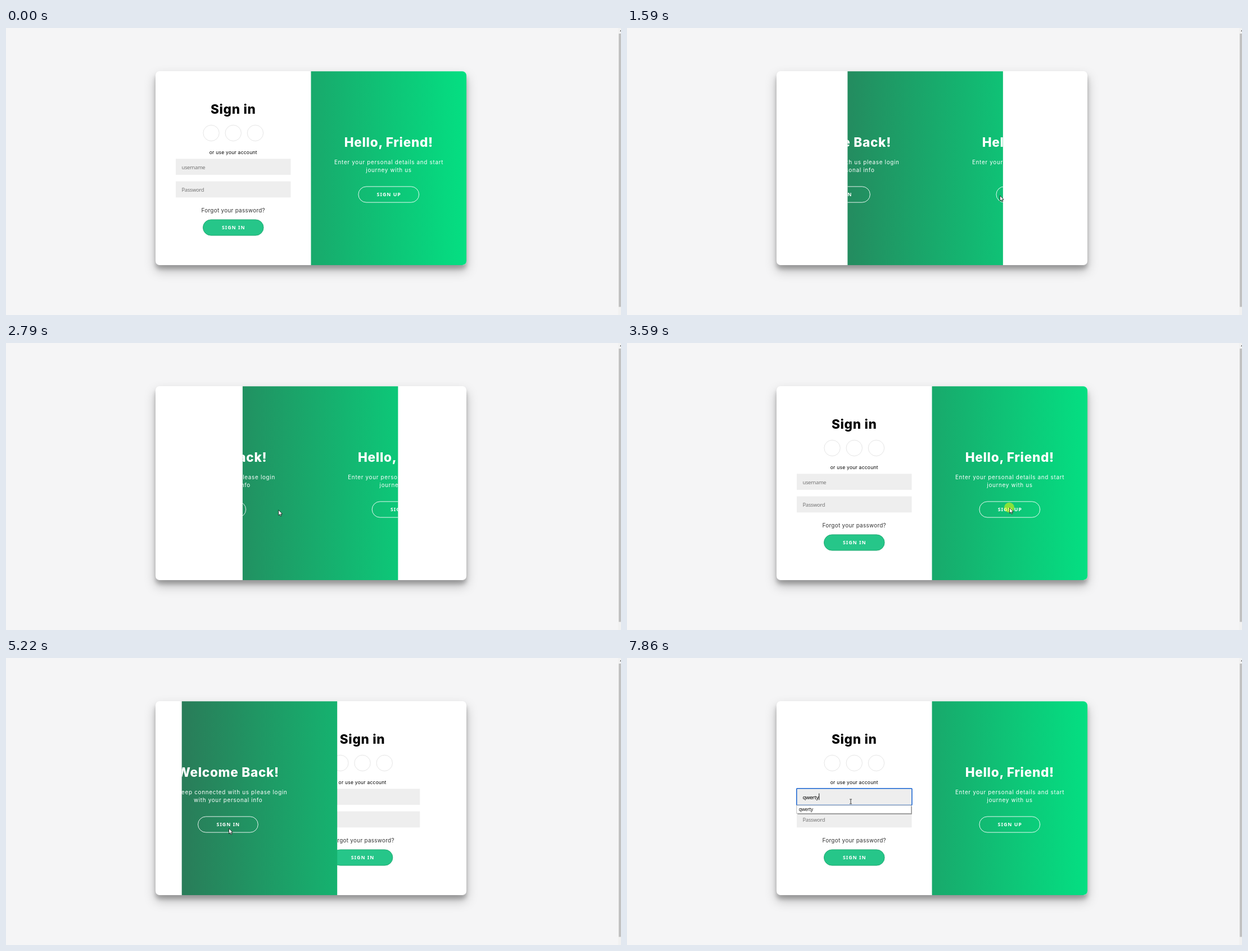
Animation of 1094x512 px, one loop 8000 ms. Source, as an HTML page:

```html
<!DOCTYPE html>
<html lang="en">
<head>
<meta charset="utf-8">
<title>Sliding sign-in form</title>
<style>
  html, body { margin: 0; width: 100%; height: 100%; overflow: hidden; background: #f5f5f6; }
  #card {
    position: absolute; left: 266px; top: 77.3px; width: 553px; height: 345.6px;
    border-radius: 7.2px; background: #fff;
    box-shadow: 0 10px 20px rgba(0,0,0,.25), 0 7.2px 7.2px rgba(0,0,0,.22);
  }
  svg { position: absolute; left: 0; top: 0; display: block; }
  text { font-family: Inter, sans-serif; white-space: pre; }
  .mid { text-anchor: middle; }
  .title { font-size: 22.6px; font-weight: 800; letter-spacing: .7px; }
  .lead { font-size: 9.9px; letter-spacing: .69px; fill: #fff; }
  .hint { font-size: 8.5px; letter-spacing: .25px; }
  .link { font-size: 9.9px; letter-spacing: .3px; fill: #333; }
  .input { font-family: "Noto Sans", sans-serif; font-size: 9.4px; letter-spacing: -.35px; fill: #757575; }
  .label { font-family: "Noto Sans", sans-serif; font-size: 8.8px; font-weight: 700; letter-spacing: 1px; fill: #fff; }
</style>
</head>
<body>
<div id="card"></div>
<svg id="stage" width="1094" height="512" viewBox="0 0 1094 512"></svg>
<script>
const LOOP = 8000, LEFT = 266, HALF = 276.5, MID = LEFT + HALF;
const LC = LEFT + HALF / 2, RC = MID + HALF / 2;

const text = (cls, x, y, s, extra = '') => `<text class="${cls}" x="${x}" y="${y}" ${extra}>${s}</text>`;
const centred = (cls, x, y, s) => text('mid ' + cls, x, y, s);
const field = (x, y, s, id = '') =>
  `<rect x="${x}" y="${y}" width="204.5" height="28.7" fill="#eee"/>` +
  text('input', x + 10.5, y + 18.2, s, id && `id="${id}"`);
const circles = (cx, cy) => [-39.2, 0, 39.2].map(d =>
  `<circle cx="${cx + d}" cy="${cy}" r="14.2" fill="none" stroke="#ddd" stroke-width=".8"/>`).join('');
const button = (cx, y, w, s, fill, stroke, id = '') =>
  `<g id="${id}"><rect x="${cx - w / 2}" y="${y}" width="${w}" height="28.2" rx="14.1" fill="${fill}"
    stroke="${stroke}" stroke-width=".9"/>${centred('label', cx + .5, y + 17.3, s)}</g>`;
const solid = (cx, y, s) => button(cx, y, 107.6, s, '#26c689', '#1ba56c');

const signIn = centred('title', LC, 152.9, 'Sign in') + circles(LC, 187.4) +
  centred('hint', LC, 224.9, 'or use your account') +
  field(302, 233.3, 'username', 'user') + field(302, 273.6, 'Password') +
  centred('link', LC, 328.8, 'Forgot your password?') + solid(LC, 341.9, 'SIGN IN');

const signUp = centred('title', LC, 149.4, 'Create Account') + circles(LC, 184) +
  centred('hint', LC, 221.4, 'or use your email for registration') +
  field(302.3, 229.9, 'Name') + field(302.3, 270.2, 'Email') + field(302.3, 310.5, 'Password') +
  solid(LC, 345.3, 'SIGN UP');

const panel = (cx, title, a, b, w, label, id) => centred('title', cx, 212, title).replace('<text', '<text fill="#fff"') +
  centred('lead', cx + .3, 243, a) + centred('lead', cx + .3, 257.4, b) +
  button(cx, 282.9, w, label, 'none', '#fff', id);

const stage = document.getElementById('stage');
stage.innerHTML = `
<defs>
  <linearGradient id="green"><stop stop-color="#2d7355"/><stop offset="1" stop-color="#04df82"/></linearGradient>
  <clipPath id="round"><rect x="266" y="77.3" width="553" height="345.6" rx="7.2"/></clipPath>
  <clipPath id="window"><rect id="pane" y="77" width="${HALF}" height="347"/></clipPath>
</defs>
<rect x="1089" width="5" height="512" fill="#f1f1f1"/>
<rect x="1090" y="10" width="4" height="487.5" fill="#c1c1c1"/>
<path d="M1092 6l2-2.4v2.4z" fill="#505050"/>
<g clip-path="url(#round)">
  <g id="in">${signIn}</g>
  <g id="up">${signUp}</g>
  <g clip-path="url(#window)">
    <rect x="266" y="77" width="553" height="347" fill="url(#green)"/>
    <g id="back">${panel(LC, 'Welcome Back!', 'To keep connected with us please login', 'with your personal info', 106.8, 'SIGN IN', 'toIn')}</g>
    <g id="hello">${panel(RC, 'Hello, Friend!', 'Enter your personal details and start', 'journey with us', 107.8, 'SIGN UP', 'toUp')}</g>
  </g>
</g>
<rect id="focus" x="301.7" y="232.8" width="205.2" height="29.6" rx="1" fill="none" stroke="#1360d0" stroke-width="1.5"/>
<g id="menu">
  <rect x="303.5" y="264.5" width="203.3" height="14.3" fill="#8a8a8a"/>
  <rect x="301.8" y="262.8" width="203.6" height="14.4" fill="#fff" stroke="#aaa" stroke-width=".8"/>
  ${text('input', 305.4, 273.3, 'qwerty', 'style="font-size:8.4px;letter-spacing:-.3px;fill:#111"')}
</g>
<rect id="caret" y="241.5" width=".9" height="11.8" fill="#000"/>
<circle id="spot" r="9" fill="#ff0" opacity=".5"/>
<path id="arrow" d="M0 0V9.6L2.2 7.6 3.7 11 5.2 10.4 3.8 7.1H6.8Z" fill="#fff" stroke-width=".8" stroke-linejoin="round"/>
<path id="beam" d="M-2-4H-.5L0-3.6 .5-4H2M0-3.6V3.6M-2 4H-.5L0 3.6 .5 4H2" fill="none" stroke="#222" stroke-width=".9"/>`;

const el = {};
stage.querySelectorAll('[id]').forEach(n => { if (n.id) el[n.id] = n; });

// start of each slide, alternating to sign-up and back to sign-in
const slides = [1276, 2470, 3719, 5050];
// mouse presses: from, to, button
const presses = [[1200, 1290, 'toUp'], [2390, 2480, 'toIn'], [3590, 3720, 'toUp'], [4950, 5060, 'toIn'], [6080, 6200, '']];
// pointer: time, x, y
const path = [
  [190, 914, 471], [320, 853, 423], [520, 853, 423], [1000, 684, 300], [1330, 684, 300],
  [1590, 664, 299], [2000, 430.5, 296.5], [2680, 430.5, 296.5], [3190, 680, 303],
  [3320, 680.5, 294], [3800, 680.5, 294], [4280, 445, 382], [4350, 397, 365],
  [4420, 390, 350], [4670, 396.5, 304], [5700, 396.5, 304], [5750, 397, 272], [6000, 398, 256]
];
const typed = [[7070, 'qw'], [7200, 'qwe'], [7400, 'qwer'], [7660, 'qwert'], [7790, 'qwerty']];

// cubic-bezier(.42, 0, .58, 1)
function easeInOut(x) {
  if (x <= 0 || x >= 1) return x <= 0 ? 0 : 1;
  let lo = 0, hi = 1, s;
  for (let i = 0; i < 24; i++) {
    s = (lo + hi) / 2;
    const bx = 3 * (1 - s) * (1 - s) * s * .42 + 3 * (1 - s) * s * s * .58 + s * s * s;
    if (bx < x) lo = s; else hi = s;
  }
  return s * s * (3 - 2 * s);
}

function pointer(t) {
  let i = path.findIndex(k => k[0] > t);
  if (i < 0) i = path.length;
  const a = path[Math.max(i - 1, 0)], b = path[Math.min(i, path.length - 1)];
  const f = b[0] > a[0] ? (t - a[0]) / (b[0] - a[0]) : 0;
  return [a[1] + (b[1] - a[1]) * f, a[2] + (b[2] - a[2]) * f];
}

const show = (n, on) => n.setAttribute('visibility', on ? 'visible' : 'hidden');
const move = (n, x, y = 0) => n.setAttribute('transform', `translate(${x} ${y})`);

function slide(t) {
  const n = slides.filter(s => s <= t).length;
  const x = n ? Math.min((t - slides[n - 1]) / 600, 1) : 1;
  const out = n % 2 === 1;
  const p = out ? easeInOut(x) : n ? 1 - easeInOut(x) : 0;
  const up = out && x >= .5;
  move(el.in, HALF * p);
  move(el.up, HALF * p);
  show(el.in, !up);
  show(el.up, up);
  el.pane.setAttribute('x', MID - HALF * p);
  move(el.back, -.2 * HALF * (1 - p));
  move(el.hello, .2 * HALF * p);
}

function press(t, x, y) {
  const now = presses.find(p => t >= p[0] && t < p[1]);
  show(el.spot, now);
  move(el.spot, x - .5, y - .5);
  for (const [id, cx] of [['toIn', LC], ['toUp', RC]]) {
    const s = now && now[2] === id ? 1 - .05 * Math.min((t - now[0]) / 80, 1) ** 1.7 : 1;
    el[id].setAttribute('transform', `translate(${cx} 297) scale(${s}) translate(${-cx} -297)`);
  }
}

function typing(t) {
  const last = typed.filter(k => k[0] <= t).pop();
  const value = last ? last[1] : '';
  const shown = value || 'username';
  if (el.user.textContent !== shown) el.user.textContent = shown;
  el.user.style.fill = value ? '#000' : '#757575';
  show(el.focus, t >= 6150);
  show(el.menu, value);
  show(el.caret, t >= 6150 && (t < 6680 || value));
  el.caret.setAttribute('x', 312.9 + (value ? el.user.getComputedTextLength() : 0));
}

function draw(t) {
  const [x, y] = pointer(t), beam = t >= 5820;
  slide(t);
  press(t, x, y);
  typing(t);
  show(el.arrow, t >= 190 && !beam);
  show(el.beam, beam);
  move(el.arrow, x, y);
  move(el.beam, x, y);
  el.arrow.setAttribute('stroke', t > 5350 && t < 5750 ? '#2b8c6c' : '#111');
}

const start = performance.now();
function tick() {
  draw((performance.now() - start) % LOOP);
  requestAnimationFrame(tick);
}
tick();
</script>
</body>
</html>
```
